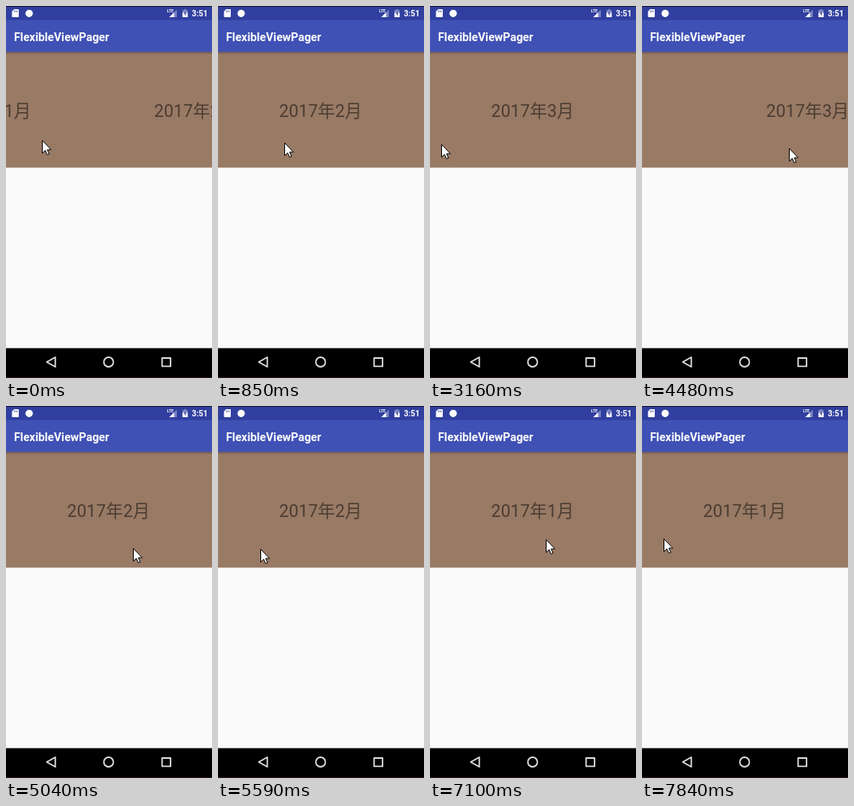
An HTML page that plays this animation: 258 px wide and 466 px high, repeating every 7990 ms.

```html
<!DOCTYPE html>
<html lang="zh-CN">
<head>
<meta charset="utf-8">
<title>FlexibleViewPager</title>
<style>
html, body { margin: 0; width: 100%; height: 100%; overflow: hidden; background: #fafafa; }
svg { display: block; width: 258px; height: 466px; }
text { font-family: Roboto, "Noto Sans CJK SC", "Noto Sans CJK", sans-serif; }
.bar { fill: #fff; font-weight: 700; }
.month { font-size: 21.6px; fill: #000; fill-opacity: .51; text-anchor: middle; }
.nav { fill: none; stroke: #ddd; stroke-width: 1.8; stroke-linejoin: round; }
</style>
</head>
<body>
<svg viewBox="0 0 258 466">
  <defs>
    <linearGradient id="shade" x2="0" y2="1">
      <stop stop-opacity=".3"/>
      <stop offset="1" stop-opacity="0"/>
    </linearGradient>
  </defs>
  <rect width="258" height="466" fill="#fafafa"/>
  <rect y="50" width="258" height="152.5" fill="#997a65"/>
  <g id="pages"></g>
  <rect y="57.6" width="258" height="3" fill="url(#shade)"/>
  <rect width="258" height="57.6" fill="#3f51b5"/>
  <rect width="258" height="17.6" fill="#303f9f"/>
  <rect width="258" height="1" fill="#111320"/>
  <text class="bar" x="10" y="44" font-size="14.3">FlexibleViewPager</text>

  <!-- status icons -->
  <path d="M10.2 4H15.2Q16 4 16 4.8V13.2Q16 14 15.2 14H8.3Q7.5 14 7.5 13.2V6.8Z" fill="#fff"/>
  <path d="M10.4 5.6V7.6M12.2 5.6V7.6M14 5.6V7.6" stroke="#303f9f" stroke-width=".9"/>
  <circle cx="29" cy="9.3" r="4.6" fill="#fff"/>
  <text class="bar" x="201.8" y="8" font-size="5">LTE</text>
  <path d="M214 4.5V14H204.5Z" fill="#fff" fill-opacity=".35"/>
  <path d="M210.5 8V14H204.5Z" fill="#fff"/>
  <path d="M221 5.2H223V4H225.5V5.2H227.5V14H221Z" fill="#fff" fill-opacity=".4"/>
  <path d="M221 8.5H227.5V14H221Z" fill="#fff"/>
  <path d="M224.8 6.5L222.8 10H224.2V12.6L226 9.2H224.8Z" fill="#303f9f"/>
  <text class="bar" x="232.8" y="13" font-size="10">3:51</text>

  <!-- navigation bar -->
  <rect y="428.6" width="258" height="38"/>
  <rect y="465" width="258" height="1" fill="#2a1420"/>
  <g class="nav">
    <path d="M51 446L61.7 440V452Z"/>
    <circle cx="128.5" cy="446" r="6"/>
    <rect x="195.5" y="441" width="10.6" height="10.4"/>
  </g>

  <path id="cursor" d="M.5 .5V16.5L4.2 12.9 6.7 18.4 9.1 17.4 6.7 12H11.5Z"
        fill="#fff" stroke="#000"/>
</svg>
<script>
const LOOP = 7990, WIDTH = 258, SETTLE = 600;
const pages = document.getElementById('pages');
const cursor = document.getElementById('cursor');

pages.innerHTML = [1, 2, 3].map((m, i) =>
  `<text class="month" x="${128.5 + i * WIDTH}" y="139">2017年${m}月</text>`).join('');

// Pointer waypoints: time, x, y
const path = [[0, 45, 168], [200, 22, 170], [850, 83, 171], [1310, 182, 172],
  [2120, 8, 187], [3630, 20, 169], [4050, 33, 172], [4480, 184, 178],
  [4620, 230, 178], [5590, 53, 179], [6530, 225, 168], [7840, 27, 166]];

// Each drag follows the pointer from x = grab, then settles on the next page
const drags = [
  { press: 0, release: 200, grab: 194, from: 0, to: 1 },
  { press: 1310, release: 2240, grab: 182, from: 1, to: 2 },
  { press: 4200, release: 4620, grab: 105.5, from: 2, to: 1 },
  { press: 5590, release: 6560, grab: 59, from: 1, to: 0 },
];

const slope = (i, k) => (path[i + 1][k] - path[i][k]) / (path[i + 1][0] - path[i][0]);

// Speed at a waypoint: zero at turning points, so the path never overshoots
function speed(i, k) {
  if (i === 0 || i === path.length - 1) return 0;
  const a = slope(i - 1, k), b = slope(i, k);
  return a * b > 0 ? 2 * a * b / (a + b) : 0;
}

function pointer(t, k) {
  const i = path.findLastIndex(p => p[0] <= t);
  if (i === path.length - 1) return path[i][k];
  const a = path[i], b = path[i + 1], span = b[0] - a[0], u = (t - a[0]) / span;
  const rise = u * u * (3 - 2 * u);
  return a[k] + (b[k] - a[k]) * rise
    + span * u * (1 - u) * (speed(i, k) * (1 - u) - speed(i + 1, k) * u);
}

function pageAt(t) {
  const d = drags.findLast(g => g.press <= t);
  const dir = d.to - d.from;
  const x = pointer(Math.min(t, d.release), 1);
  const held = d.from + dir * Math.max(0, dir * (d.grab - x) / WIDTH);
  const u = Math.min(1, Math.max(0, (t - d.release) / SETTLE));
  return d.to + (held - d.to) * (1 - u) ** 5;
}

function draw(t) {
  const shift = Math.round(-pageAt(t) * WIDTH);
  pages.setAttribute('transform', `translate(${shift})`);
  cursor.setAttribute('transform',
    `translate(${Math.round(pointer(t, 1))} ${Math.round(pointer(t, 2))})`);
}

const start = performance.now();
function loop() {
  draw((performance.now() - start) % LOOP);
  requestAnimationFrame(loop);
}
loop();
</script>
</body>
</html>
```
